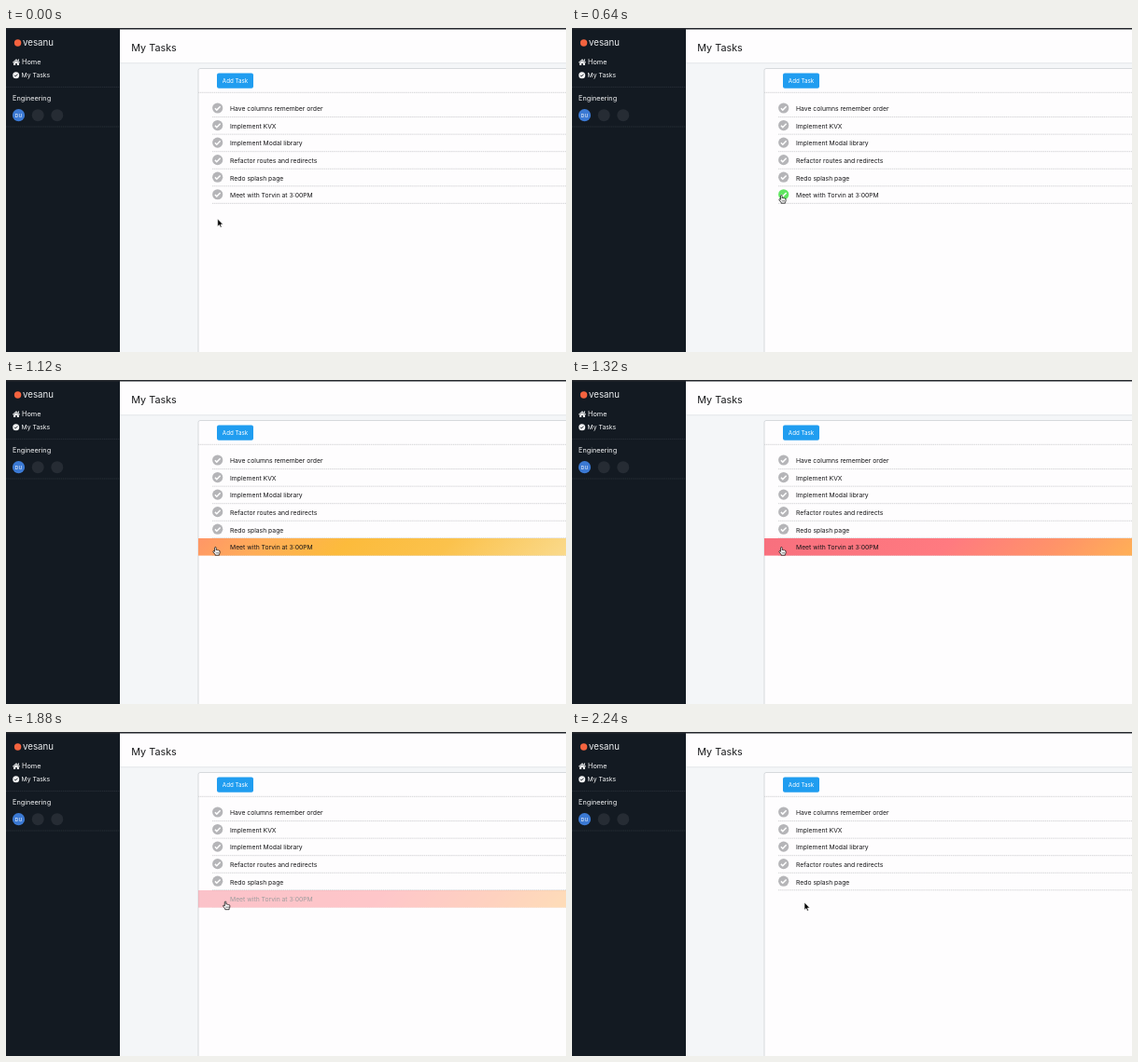
These frames come from a looping animation (600 px wide and 348 px high, 2280 ms). An HTML page:

```html
<!DOCTYPE html>
<html lang="en">
<head>
<meta charset="utf-8">
<title>My Tasks</title>
<style>
  html, body { margin: 0; width: 100%; height: 100%; overflow: hidden; background: #fff; }
  svg { display: block; width: 100vw; height: 100vh; }
  text { font-family: Inter, sans-serif; }
  .side { fill: #f4f5f6; font-size: 7.3px; }
  .task { fill: #161618; font-size: 6.8px; }
  .rule { stroke: #c9c9cd; stroke-width: .8; stroke-dasharray: 1.4 .7; }
  .sideRule { stroke: #2d333b; stroke-width: .8; stroke-dasharray: 1.4 .7; }
</style>
</head>
<body>
<svg viewBox="0 0 600 348" preserveAspectRatio="none">
  <defs>
    <linearGradient id="sweep" gradientUnits="userSpaceOnUse" x1="206" y1="0" x2="1030" y2="0"></linearGradient>
    <linearGradient id="shade" x1="0" y1="0" x2="0" y2="1">
      <stop offset="0" stop-color="#e4e7ea"/>
      <stop offset="1" stop-color="#f4f6f8"/>
    </linearGradient>
    <g id="tick">
      <circle r="5.6"/>
      <path d="M-2.8 .2 L-.9 2.1 L2.9 -1.8" fill="none" stroke="#fff" stroke-width="1.5"/>
    </g>
  </defs>

  <rect width="600" height="348" fill="#f4f6f8"/>
  <rect x="122" width="478" height="37" fill="#fefdfe"/>
  <rect x="122" y="37" width="478" height="2" fill="url(#shade)"/>
  <rect width="122" height="348" fill="#131a22"/>
  <rect width="600" height="1.5" fill="#24272c"/>

  <circle cx="12.6" cy="16" r="3.7" fill="#f4633f"/>
  <text x="18" y="18.8" font-size="9.7" fill="#eceef0">vesanu</text>
  <path d="M6.9 36.9 L11 33.2 L15.1 36.9 L14.5 37.5 L11 34.5 L7.5 37.5 Z M8.1 37.6 L11 35.1 L13.9 37.6 V40 H11.8 V38 H10.2 V40 H8.1 Z M13 33.5 h1 v2 l-1 -.9 Z" fill="#f4f5f6"/>
  <text x="17" y="39.3" class="side">Home</text>
  <circle cx="10.7" cy="50.7" r="3.5" fill="#f4f5f6"/>
  <path d="M9 50.8 L10.2 52 L12.5 49.6" fill="none" stroke="#131a22" stroke-width=".9"/>
  <text x="16.6" y="53.3" class="side" style="font-size:6.8px">My Tasks</text>
  <path d="M0 63.4 H122 M0 106 H122" class="sideRule"/>
  <text x="7" y="77.6" class="side">Engineering</text>
  <circle cx="13.5" cy="93.7" r="6.6" fill="#3b79d3"/>
  <text x="13.5" y="95.6" font-size="5.3" fill="#fff" text-anchor="middle">DU</text>
  <circle cx="34.2" cy="93.7" r="6.5" fill="#262c34"/>
  <circle cx="54.8" cy="93.7" r="6.5" fill="#262c34"/>

  <text x="134.3" y="24.6" font-size="10.8" fill="#17181a">My Tasks</text>

  <path d="M206 360 V45.5 Q206 43.5 208 43.5 H610 V360 Z" fill="#fefdfe" stroke="#d3d6da" stroke-width=".9"/>
  <rect x="226" y="48.6" width="39" height="16.2" rx="2" fill="#209df0"/>
  <text x="245.5" y="59" font-size="6.2" fill="#fff" text-anchor="middle">Add Task</text>
  <path d="M206 69.3 H600" class="rule"/>

  <g id="list"></g>

  <path id="arrow" d="M0 0 V8.2 L1.9 6.5 L3.1 9.2 L4.5 8.6 L3.3 6 H5.8 Z" fill="#080808" stroke="#fff" stroke-width=".6"/>
  <g id="hand" stroke="#080808" stroke-width=".75" stroke-linejoin="round">
    <path d="M-.9 .8 Q-.9 0 -.1 0 Q.7 0 .7 .8 V3.1 Q1.6 2.5 2.1 3.3 Q3 2.8 3.4 3.7 Q4.6 3.4 4.6 4.6 V6 Q4.4 7.2 3.9 7.7 V8.7 H-.4 V7.9 Q-1.6 6.6 -2.6 4.9 Q-2.6 3.8 -1.6 4.2 L-.9 4.9 Z" fill="#fff"/>
    <path d="M.7 5.4 V7 M1.9 5.4 V7 M3.1 5.4 V7" stroke-width=".45"/>
  </g>
</svg>
<script>
const LOOP = 2280, STEP = 40;
const $ = id => document.getElementById(id);

function make(parent, tag, attrs, text) {
  const el = document.createElementNS('http://www.w3.org/2000/svg', tag);
  for (const k in attrs) el.setAttribute(k, attrs[k]);
  if (text) el.textContent = text;
  return parent.appendChild(el);
}

const spectrum = [
  [206, '#f8707e'], [400, '#ff7a80'], [520, '#ff9468'], [600, '#ffad58'],
  [690, '#fcbb3c'], [800, '#fbc24c'], [934, '#fad98a']
];
for (const [x, color] of spectrum)
  make($('sweep'), 'stop', { offset: (x - 206) / 824, 'stop-color': color });
make($('sweep'), 'stop', { offset: 1, 'stop-color': '#fdf0cf', 'stop-opacity': 0 });

const tasks = [
  'Have columns remember order', 'Implement KVX', 'Implement Modal library',
  'Refactor routes and redirects', 'Redo splash page', 'Meet with Torvin at 3:00PM'
];
const rows = tasks.map((label, i) => {
  const y = 86 + i * 18.55;
  const g = make($('list'), 'g', {});
  const tick = make(g, 'use', { href: '#tick', x: 226.7, y, fill: '#b5b5b8' });
  make(g, 'path', { d: `M221 ${y + 9.6} H600`, class: 'rule' });
  const band = i === 5 && make(g, 'rect', { x: 206, y: 170, width: 394, height: 18.6, fill: 'url(#sweep)' });
  make(g, 'text', { x: 240, y: y + 3.3, class: 'task' }, label);
  return { g, tick, band };
});
const last = rows[5];

const clamp = v => Math.min(1, Math.max(0, v));
const part = (t, a, b) => clamp((t - a) / (b - a));
const smooth = p => p * p * (3 - 2 * p);
const bend = (a, c, b, p) => a * (1 - p) ** 2 + 2 * c * p * (1 - p) + b * p * p;

function along(keys, t) {
  let i = 0;
  while (i < keys.length - 2 && t > keys[i + 1][0]) i++;
  const [a, b] = [keys[i], keys[i + 1]], p = part(t, a[0], b[0]);
  return [a[1] + (b[1] - a[1]) * p, a[2] + (b[2] - a[2]) * p];
}

const drift = [
  [1440, 224.5, 179.5], [1560, 226, 179.9], [1720, 230.7, 181], [1880, 235.2, 182],
  [2160, 235.2, 182], [2200, 245, 182.8], [2240, 249, 183]
];

function pointer(t) {
  if (t > 1440) return along(drift, t);
  const p = smooth(part(t, 0, 560));
  return [bend(226.7, 238, 224.5, p), bend(205, 196, 179.5, p)];
}

function draw(t) {
  const [x, y] = pointer(t);
  const over = t < 700 && Math.hypot(x - 226.7, y - 178.8) < 5.6;
  const isHand = over || (t >= 560 && t < 2200);
  $('hand').style.display = isHand ? '' : 'none';
  $('arrow').style.display = isHand ? 'none' : '';
  $(isHand ? 'hand' : 'arrow').setAttribute('transform', `translate(${x} ${y})`);

  last.tick.setAttribute('fill', over || t >= 560 ? '#60e561' : '#b5b5b8');
  const shift = -824 * (1 - part(t, 680, 1320) ** 1.36);
  $('sweep').setAttribute('gradientTransform', `translate(${shift + 179} 0) skewX(-45)`);
  last.band.style.display = t > 680 ? '' : 'none';
  last.g.setAttribute('opacity', t >= 2000 ? 0 : 1 - part(t, 1680, 2020));
}

const start = performance.now();
function tick() {
  const t = (performance.now() - start) % LOOP;
  draw(t - t % STEP);
  requestAnimationFrame(tick);
}
tick();
</script>
</body>
</html>
```
